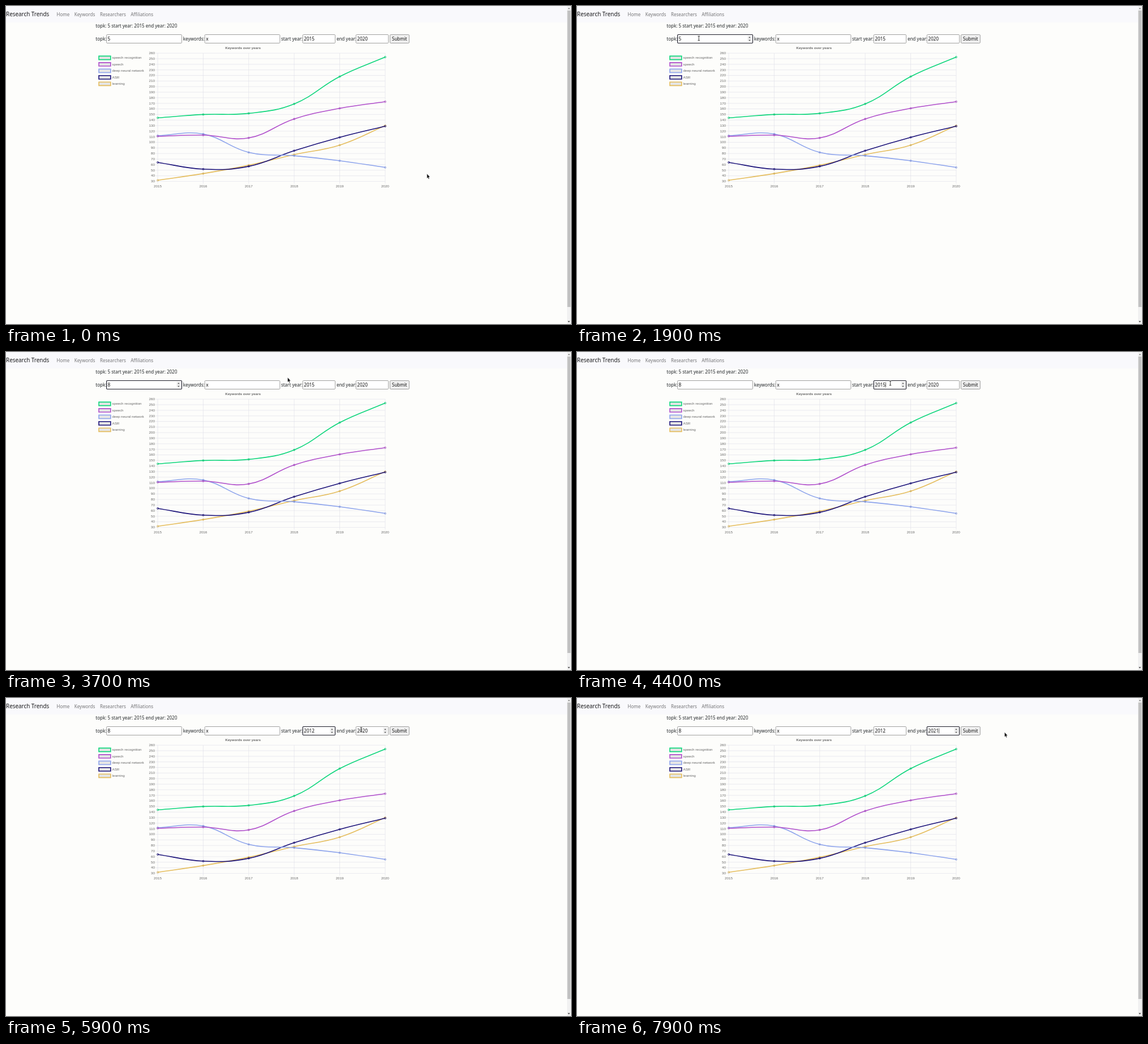
An HTML page with a canvas for the animation above (8 s loop, 998 by 561 pixels).

```html
<!DOCTYPE html>
<html lang="en">
<head>
<meta charset="utf-8">
<title>Research Trends</title>
<style>
html, body { margin: 0; width: 100%; height: 100%; overflow: hidden; background: #fdfdfb; }
canvas { display: block; width: 998px; height: 561px; }
</style>
</head>
<body>
<canvas id="stage"></canvas>
<script>
const W = 998, H = 561, LOOP = 8000, STEP = 100;
const canvas = document.getElementById('stage');
const ctx = canvas.getContext('2d');
const dpr = window.devicePixelRatio || 1;
canvas.width = W * dpr;
canvas.height = H * dpr;

const UI = '"Noto Sans", "Open Sans", sans-serif';
const CHART = '"Liberation Sans", Arial, sans-serif';
const GRID = '#dddde8';

const plot = { left: 268, right: 669.8, top: 83.2, bottom: 309.4, min: 30, max: 260 };
const series = [
  { name: 'speech recognition', color: '#0dd67b', data: [144, 150, 152, 169, 218, 253] },
  { name: 'speech', color: '#b04ecb', data: [111, 113, 108, 142, 161, 173] },
  { name: 'deep neural network', color: '#8ba2ec', data: [112, 115, 82, 76, 67, 55] },
  { name: 'ASR', color: '#191078', data: [64, 52, 57, 85, 109, 129] },
  { name: 'learning', color: '#e5bd5d', data: [32, 44, 59, 78, 95, 130] }
];

// Field values are [start time, text]; carets are [on, off] spans.
const fields = [
  { label: 'topk:', lx: 158.3, x: 177.6, w: 132.8, values: [[0, '5'], [2500, ''], [3000, '8']],
    focus: [1400, 4400], spin: [1200, 4400], carets: [[1400, 1900], [2400, 3500]] },
  { label: 'keywords:', lx: 312.8, x: 351.2, w: 132.6, values: [[0, 'x']] },
  { label: 'start year:', lx: 485.9, x: 524.2, w: 57.2, values: [[0, '2015'], [5000, '201'], [5200, '2012']],
    focus: [4400, 6200], spin: [4000, 6200], carets: [[4400, 4900], [5000, 5700]] },
  { label: 'end year:', lx: 583.9, x: 618.2, w: 57.2, values: [[0, '2020'], [7100, '202'], [7500, '2021']],
    focus: [6200, 8000], spin: [5800, 8000], carets: [[6200, 6700], [7100, 8000]] }
];
const fieldTop = 50.5, fieldHeight = 15;

// Pointer stops: time, x, y
const pointer = [
  [0, 743.6, 296], [950, 229, 86], [1100, 215.3, 57], [3400, 215, 57],
  [3700, 497.5, 45], [4000, 553.4, 53], [4400, 553.4, 55], [5200, 574, 57],
  [5400, 574, 57], [5900, 627.4, 56], [6150, 630, 57], [6300, 675, 58],
  [6500, 755.3, 60.5], [8000, 755.3, 60.5]
];

const within = (t, span) => !!span && t >= span[0] && t < span[1];
const clamp = (v, lo, hi) => Math.max(lo, Math.min(hi, v));

function text(str, x, y, size, color, { font = UI, align = 'left', weight = '', base = 'alphabetic' } = {}) {
  ctx.font = `${weight} ${size}px ${font}`;
  ctx.fillStyle = color;
  ctx.textAlign = align;
  ctx.textBaseline = base;
  ctx.fillText(str, x, y);
}

function line(x1, y1, x2, y2, color, width) {
  ctx.strokeStyle = color;
  ctx.lineWidth = width;
  ctx.beginPath();
  ctx.moveTo(x1, y1);
  ctx.lineTo(x2, y2);
  ctx.stroke();
}

function box(x, y, w, h, r, fill, stroke, width) {
  ctx.beginPath();
  ctx.roundRect(x, y, w, h, r);
  ctx.fillStyle = fill;
  ctx.fill();
  ctx.strokeStyle = stroke;
  ctx.lineWidth = width;
  ctx.stroke();
}

function poly(points, fill) {
  ctx.beginPath();
  points.forEach(([x, y]) => ctx.lineTo(x, y));
  ctx.closePath();
  ctx.fillStyle = fill;
  ctx.fill();
}

const xAt = i => plot.left + (plot.right - plot.left) * i / 5;
const yAt = v => plot.top + (plot.bottom - plot.top) * (plot.max - v) / (plot.max - plot.min);

// Cardinal spline handles, weighted by the distance to each neighbour.
function handles(points, i) {
  const p = points[i], a = points[i - 1] || p, b = points[i + 1] || p;
  const da = Math.hypot(p.x - a.x, p.y - a.y), db = Math.hypot(b.x - p.x, b.y - p.y);
  const ka = 0.4 * da / (da + db), kb = 0.4 * db / (da + db);
  const at = k => ({
    x: clamp(p.x + k * (b.x - a.x), plot.left, plot.right),
    y: clamp(p.y + k * (b.y - a.y), plot.top, plot.bottom)
  });
  return { before: at(-ka), after: at(kb) };
}

function drawSeries({ data, color }) {
  const points = data.map((v, i) => ({ x: xAt(i), y: yAt(v) }));
  ctx.strokeStyle = color;
  ctx.lineWidth = 1.6;
  ctx.beginPath();
  ctx.moveTo(points[0].x, points[0].y);
  for (let i = 1; i < points.length; i++) {
    const c1 = handles(points, i - 1).after, c2 = handles(points, i).before;
    ctx.bezierCurveTo(c1.x, c1.y, c2.x, c2.y, points[i].x, points[i].y);
  }
  ctx.stroke();
  ctx.lineWidth = 0.7;
  for (const p of points) {
    ctx.beginPath();
    ctx.arc(p.x, p.y, 1.6, 0, Math.PI * 2);
    ctx.fillStyle = 'rgba(0,0,0,0.1)';
    ctx.fill();
    ctx.stroke();
  }
}

function drawChart() {
  const opts = { font: CHART, base: 'middle' };
  text('Keywords over years', 418.5, 74.3, 6.24, '#666', { ...opts, align: 'center', weight: 'bold' });
  for (let v = plot.min; v <= plot.max; v += 10) {
    line(264.5, yAt(v), plot.right, yAt(v), GRID, 0.6);
    text(v, 263, yAt(v) + 0.2, 6.24, '#666', { ...opts, align: 'right' });
  }
  for (let i = 0; i < 6; i++) {
    line(xAt(i), plot.top, xAt(i), plot.bottom + 4, GRID, 0.6);
    text(2015 + i, xAt(i), 318.2, 6.24, '#666', { ...opts, align: 'center' });
  }
  series.forEach((s, i) => {
    const y = 91.5 + i * 11.45;
    box(164, y - 3.1, 20.8, 6.2, 0, '#e5e5e5', s.color, 1.6);
    text(s.name, 187.6, y + 0.2, 6.2, '#666', opts);
  });
  [...series].reverse().forEach(drawSeries);
}

function drawPage() {
  ctx.fillStyle = '#fdfdfb';
  ctx.fillRect(0, 0, W, H);
  ctx.fillStyle = '#f9f9fc';
  ctx.fillRect(0, 0, 991, 29);

  text('Research Trends', 0, 18, 9.9, '#18181a');
  [['Home', 89.6], ['Keywords', 120.8], ['Researchers', 166], ['Affiliations', 220.2]]
    .forEach(([name, x]) => text(name, x, 17.6, 8, '#747476'));
  text('topk: 5 start year: 2015 end year: 2020', 158.3, 38.4, 8.02, '#212529');

  ctx.fillStyle = '#f1f1f1';
  ctx.fillRect(991, 0, 7, H);
  ctx.fillStyle = '#c1c1c1';
  ctx.fillRect(991.6, 8, 5.6, 523);
  poly([[992.6, 5.2], [996.2, 5.2], [994.4, 3]], '#777');
  poly([[992.2, 555.8], [996.2, 555.8], [994.2, 558.2]], '#444');
}

function drawField(f, t) {
  const focused = within(t, f.focus);
  const value = f.values.filter(([start]) => start <= t).pop()[1];
  text(f.label, f.lx, 60.6, 8, '#212529');
  box(f.x, fieldTop, f.w, fieldHeight, 1.2, '#fff', focused ? '#1c1c28' : '#8a8a8a', focused ? 1.15 : 0.8);
  if (within(t, f.spin)) {
    const cx = f.x + f.w - 5.6;
    ctx.fillStyle = '#efefef';
    ctx.fillRect(cx - 3.6, 52.4, 7.4, 11);
    poly([[cx - 1.7, 56.2], [cx + 1.7, 56.2], [cx, 54.1]], '#505050');
    poly([[cx - 1.7, 59.8], [cx + 1.7, 59.8], [cx, 61.9]], '#505050');
  }
  text(value, f.x + 2, 60.6, 8.2, '#111');
  if ((f.carets || []).some(span => within(t, span))) {
    const cx = f.x + 2.4 + ctx.measureText(value).width;
    line(cx, 53.4, cx, 62.6, '#111', 0.7);
  }
}

function pointerAt(t) {
  const i = pointer.findIndex(p => p[0] > t);
  const [t0, x0, y0] = pointer[i - 1], [t1, x1, y1] = pointer[i];
  const u = (t - t0) / (t1 - t0), e = u * u * (3 - 2 * u);
  return [x0 + (x1 - x0) * e, y0 + (y1 - y0) * e];
}

function drawPointer(t) {
  const [x, y] = pointerAt(t);
  const overText = y > fieldTop && y < fieldTop + fieldHeight &&
    fields.some(f => x > f.x && x < f.x + f.w - (f.spin ? 9 : 0));
  ctx.save();
  ctx.translate(x, y);
  if (overText) {
    for (const [color, width] of [['#fff', 1.8], ['#222', 0.9]]) {
      line(0, -3.8, 0, 3.8, color, width);
      line(-1.8, -3.8, 1.8, -3.8, color, width);
      line(-1.8, 3.8, 1.8, 3.8, color, width);
    }
  } else {
    poly([[0, 0], [0, 8], [1.7, 6.4], [2.8, 9.2], [4.1, 8.7], [3, 6], [5.2, 5.8]], '#111');
    ctx.strokeStyle = '#fff';
    ctx.lineWidth = 0.3;
    ctx.stroke();
  }
  ctx.restore();
}

function draw(t) {
  ctx.setTransform(dpr, 0, 0, dpr, 0, 0);
  drawPage();
  fields.forEach(f => drawField(f, t));
  box(678.2, fieldTop, 34, fieldHeight, 1.5, '#efefef', '#8a8a8a', 0.8);
  text('Submit', 695.1, 60.6, 8, '#111', { align: 'center' });
  drawChart();
  drawPointer(t);
}

const begin = performance.now();
function tick() {
  const t = (performance.now() - begin) % LOOP;
  draw(Math.floor(t / STEP) * STEP);
  requestAnimationFrame(tick);
}
tick();
</script>
</body>
</html>
```
